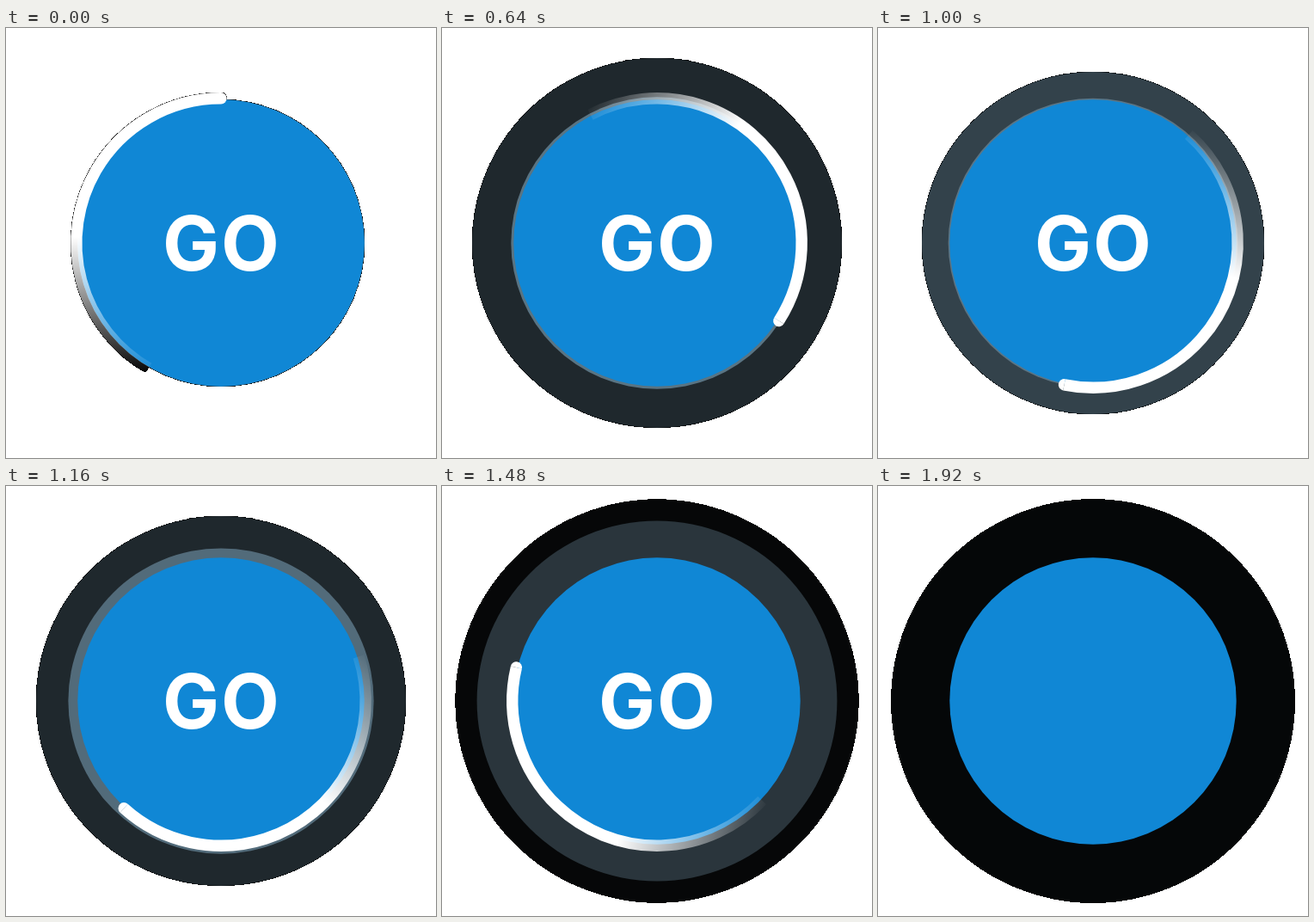
These frames come from a looping animation (500x500 px, 1960 ms). An HTML page with a canvas:

```html
<!DOCTYPE html>
<html lang="en">
<head>
<meta charset="utf-8">
<title>Go button</title>
<style>
html, body { margin: 0; width: 100%; height: 100%; overflow: hidden; background: #fff; }
canvas { display: block; width: 500px; height: 500px; }
</style>
</head>
<body>
<canvas id="stage" width="500" height="500"></canvas>
<script>
const SIZE = 500, MID = 250;
const LOOP = 1960, STEP = 40, TURN = 1880;
const DISC_R = 166.7, RING_FROM = 167, RING_TO = 235;
const ARC_R = 168.2, ARC_W = 13.4, ARC_SPAN = 150;
const RINGS = [
  { start: 0, length: 1000, until: 1000 },
  { start: 520, length: 1000, until: 1520 },
  { start: 920, length: 960, until: LOOP }
];

const ctx = document.getElementById('stage').getContext('2d', { willReadFrequently: true });
const rad = deg => deg * Math.PI / 180;
const ease = u => u * u * (3 - 2 * u);

function disc(r, fill) {
  ctx.fillStyle = fill;
  ctx.beginPath();
  ctx.arc(MID, MID, r, 0, Math.PI * 2);
  ctx.fill();
}

function drawRing(ring, t) {
  if (t < ring.start || t >= ring.until) return;
  const p = ease(Math.min(1, (t - ring.start) / ring.length));
  disc(RING_FROM + (RING_TO - RING_FROM) * p, `rgba(92,119,135,${1 - 0.94 * p})`);
}

// A comet: round head at the top, tail fading out along a straight gradient.
function drawArc(angle) {
  ctx.save();
  ctx.translate(MID, MID);
  ctx.rotate(rad(angle));
  const fade = ctx.createLinearGradient(0, -7, 0, 155);
  fade.addColorStop(0, 'rgba(255,255,255,1)');
  fade.addColorStop(1, 'rgba(255,255,255,0)');
  ctx.strokeStyle = fade;
  ctx.lineWidth = ARC_W;
  ctx.beginPath();
  ctx.arc(0, 0, ARC_R, rad(-90 - ARC_SPAN), rad(-90));
  ctx.stroke();
  ctx.fillStyle = '#fff';
  ctx.beginPath();
  ctx.arc(0, -ARC_R, ARC_W / 2, rad(-90), rad(90));
  ctx.fill();
  ctx.restore();
}

function drawLabel() {
  ctx.font = '700 88px Inter, "Liberation Sans", sans-serif';
  ctx.fillStyle = '#fff';
  ctx.textBaseline = 'alphabetic';
  const g = ctx.measureText('G'), o = ctx.measureText('O');
  ctx.fillText('G', 186 + g.actualBoundingBoxLeft, 282);
  ctx.fillText('O', 314 - o.actualBoundingBoxRight, 282);
}

// Flatten every touched pixel onto black; untouched ones stay clear.
function matte() {
  const img = ctx.getImageData(0, 0, SIZE, SIZE), d = img.data;
  for (let i = 0; i < d.length; i += 4) {
    const a = d[i + 3];
    if (a === 255) continue;
    if (a < 8) { d[i + 3] = 0; continue; }
    for (let c = 0; c < 3; c++) d[i + c] = d[i + c] * a / 255;
    d[i + 3] = 255;
  }
  ctx.putImageData(img, 0, 0);
}

function draw(t) {
  ctx.clearRect(0, 0, SIZE, SIZE);
  RINGS.forEach(ring => drawRing(ring, t));
  disc(DISC_R, '#1087d5');
  if (t <= TURN) {
    drawArc(360 * t / TURN);
    drawLabel();
  }
  matte();
}

let begin = null, shown = -1;
function tick(now) {
  if (begin === null) begin = now;
  const t = Math.floor(((now - begin) % LOOP) / STEP) * STEP;
  if (t !== shown) draw(shown = t);
  requestAnimationFrame(tick);
}
requestAnimationFrame(tick);
</script>
</body>
</html>
```
